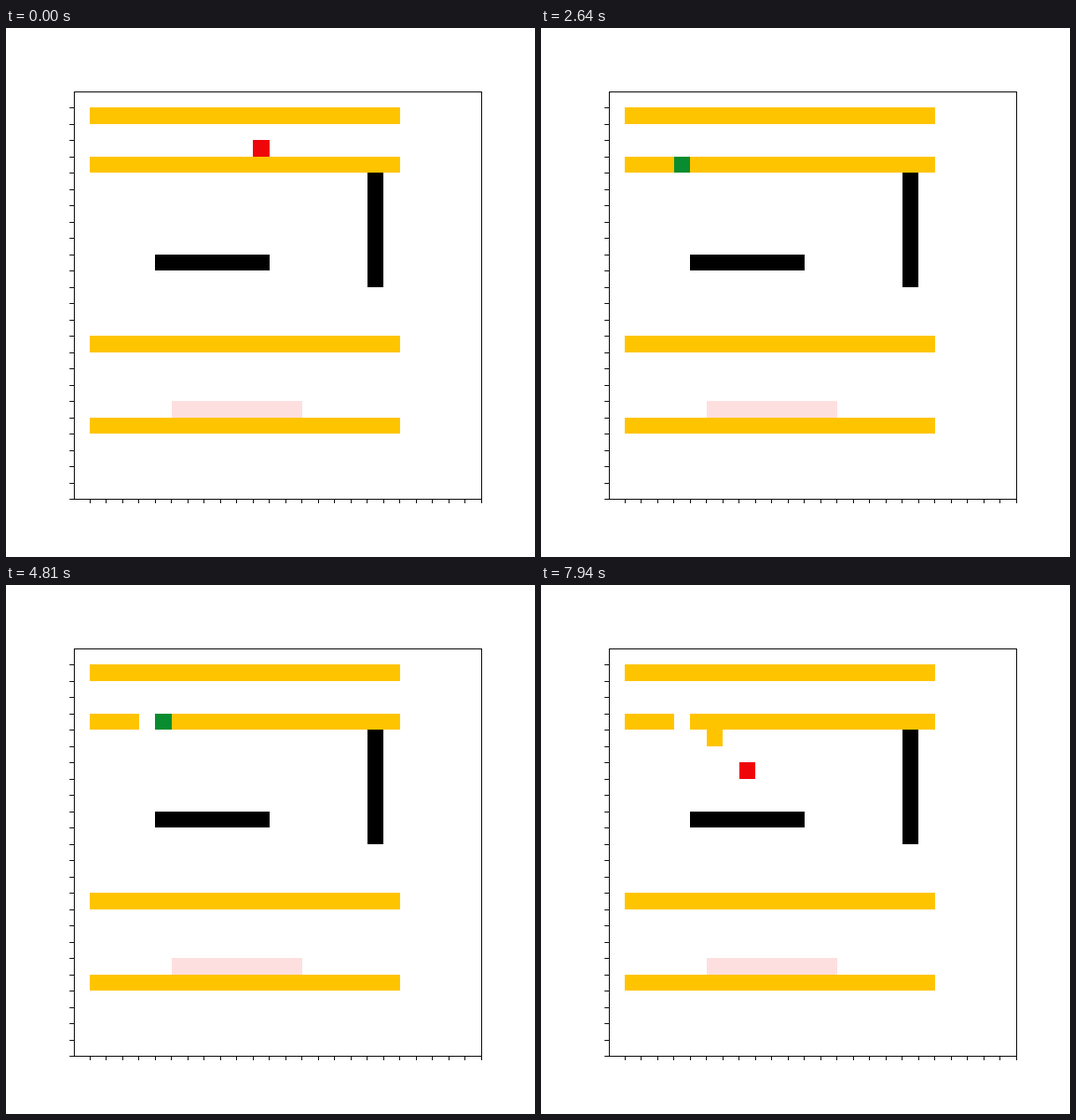
Write an HTML page that moves like this. It is 600 by 600 pixels and loops after 8 s.

```html
<!DOCTYPE html>
<html lang="en">
<head>
<meta charset="utf-8">
<title>Grid agent</title>
<style>
  html, body { margin: 0; width: 100%; height: 100%; overflow: hidden; background: #fff; }
  svg { display: block; width: 100%; height: 100%; }
</style>
</head>
<body>
<svg id="stage" viewBox="0 0 600 600" shape-rendering="crispEdges"></svg>
<script>
const LOOP = 8000, STEP = 80;
const LEFT = 77, TOP = 72, CELL = 462 / 25;
const GOLD = '#ffc400', RED = '#ef0609', GREEN = '#088c2f', BLACK = '#000', PINK = '#fedfdf';
const MOVES = { L: [-1, 0], R: [1, 0], U: [0, -1], D: [0, 1] };

// Runs of steps: start time, then one action per step (G = grab, P = put down).
const RUNS = [
  [240, 'DD'], [480, 'LDRDLLU'], [1120, 'LU'], [1360, 'RDLLDL'], [1920, 'L'],
  [2080, 'ULD'], [2400, 'UUUGULLULDR'], [3280, 'UDRDRUL'], [3920, 'RDRURDUD'],
  [4810, 'LLD'], [5210, 'DD'], [5450, 'RURPR'], [5930, 'LGUU'], [6500, 'DU'],
  [6740, 'D'], [6900, 'DU'], [7140, 'PD'], [7380, 'U'], [7540, 'RR'], [7860, 'DD']
];

const stage = document.getElementById('stage');
const colX = c => Math.round(LEFT + c * CELL);
const rowY = r => Math.round(TOP + r * CELL);

function setAttrs(el, attrs) {
  for (const key in attrs) el.setAttribute(key, attrs[key]);
}

function addRect(attrs) {
  const el = document.createElementNS('http://www.w3.org/2000/svg', 'rect');
  setAttrs(el, attrs);
  stage.appendChild(el);
  return el;
}

function cellBox(c, r, w = 1, h = 1) {
  const x = colX(c), y = rowY(r);
  return { x, y, width: colX(c + w) - x, height: rowY(r + h) - y };
}

const addCells = (fill, ...box) => addRect({ ...cellBox(...box), fill });

function drawScene() {
  for (const r of [1, 15, 20]) addCells(GOLD, 1, r, 19);
  addCells(GOLD, 1, 4, 3);
  addCells(GOLD, 5, 4, 15);
  addCells(BLACK, 5, 10, 7);
  addCells(BLACK, 18, 5, 1, 7);
  addCells(PINK, 6, 19, 8);
  addRect({ x: 77.5, y: 72.5, width: 462, height: 462, fill: 'none', stroke: BLACK });
  for (let i = 1; i <= 25; i++) {
    addRect({ x: Math.floor(LEFT + i * CELL + 1e-6), y: 534, width: 1, height: 5, fill: BLACK });
    addRect({ x: 72, y: rowY(i), width: 5, height: 1, fill: BLACK });
  }
}

function stateAt(time) {
  let pos = [11, 3], block = [4, 4];
  for (const [start, actions] of RUNS) {
    [...actions].forEach((action, i) => {
      if (time < start + i * STEP) return;
      if (action === 'G') block = null;
      else if (action === 'P') block = pos;
      else pos = pos.map((v, axis) => v + MOVES[action][axis]);
    });
  }
  return { pos, block };
}

drawScene();
const blockEl = addCells(GOLD, 4, 4);
const agentEl = addCells(RED, 11, 3);

function render(time) {
  const { pos, block } = stateAt(time);
  blockEl.setAttribute('visibility', block ? 'visible' : 'hidden');
  if (block) setAttrs(blockEl, cellBox(...block));
  setAttrs(agentEl, { ...cellBox(...pos), fill: block ? RED : GREEN });
}

function tick() {
  render(performance.now() % LOOP);
  requestAnimationFrame(tick);
}
tick();
</script>
</body>
</html>
```
